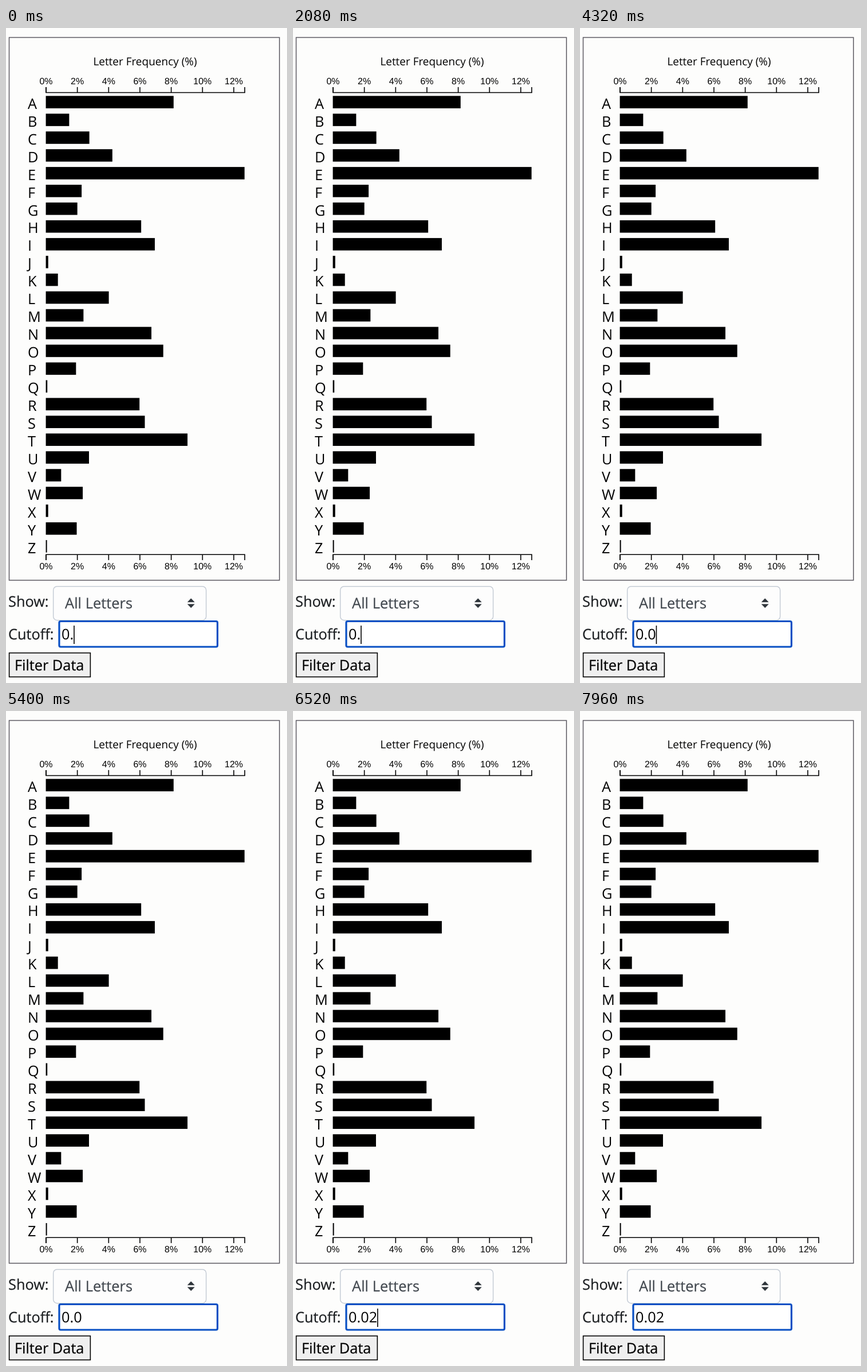
These frames come from a looping animation (491x1141 px, 8000 ms). An HTML page:

```html
<!DOCTYPE html>
<html lang="en">
<head>
<meta charset="utf-8">
<title>Letter Frequency</title>
<style>
  html, body { margin: 0; width: 100%; height: 100%; overflow: hidden; background: #fdfdfc; }
  svg { display: block; font: 25.3px "Open Sans", "Noto Sans", sans-serif; text-rendering: geometricPrecision; }
  .axis { font: 16px "Liberation Sans", Arial, sans-serif; text-anchor: middle; }
  .line { fill: none; stroke: #000; stroke-width: 1.6; }
  .label { fill: #1b1e21; stroke: #1b1e21; stroke-width: 0.25; }
</style>
</head>
<body>
<svg width="491" height="1141" viewBox="0 0 491 1141">
  <rect x="5.5" y="16.5" width="472.3" height="945.5" fill="none" stroke="#5c5a62" stroke-width="1.5"/>
  <text x="243" y="65" font-size="19" text-anchor="middle">Letter Frequency (%)</text>
  <g id="chart"></g>

  <text class="label" x="4" y="1008">Show:</text>
  <rect x="82.7" y="972.7" width="267" height="59" rx="6.5" fill="#fdfdfd" stroke="#c6cdd6" stroke-width="1.5"/>
  <text x="103" y="1011" font-size="25.5" fill="#42484f" stroke="#42484f" stroke-width="0.25">All Letters</text>
  <path d="M316.8 1000.3l6.5-6.8 6.5 6.8zM316.8 1003.5l6.5 6.8 6.5-6.8z" fill="#2f353b"/>

  <text class="label" x="4" y="1065">Cutoff:</text>
  <rect x="93" y="1033.5" width="276.5" height="44.5" rx="2.5" fill="#fff" stroke="#0950c4" stroke-width="3.2"/>
  <text id="value" x="97" y="1065"></text>
  <rect id="caret" y="1041" width="1.6" height="32"/>

  <rect x="5.6" y="1088.6" width="141.8" height="41.8" fill="#efefef" stroke="#000" stroke-width="1.6"/>
  <text x="15" y="1119" stroke="#000" stroke-width="0.25">Filter Data</text>
</svg>
<script>
const frequencies = [
  8.167, 1.492, 2.782, 4.253, 12.702, 2.288, 2.015, 6.094, 6.966, 0.153, 0.772, 4.025, 2.406,
  6.749, 7.507, 1.929, 0.095, 5.987, 6.327, 9.056, 2.758, 0.978, 2.36, 0.15, 1.974, 0.074
];
const left = 70, right = 417.2, rowStep = 30.95;
const scale = (right - left) / 12.702;

const bars = frequencies.map((percent, i) => {
  const y = 118.3 + i * rowStep;
  return `<rect x="${left - 0.4}" y="${y}" width="${percent * scale}" height="21.6"/>
    <text x="38" y="${y + 22.5}">${String.fromCharCode(65 + i)}</text>`;
});

function axis(y, direction, baseline) {
  const tickEnd = y + direction * 9.6;
  let out = `<path class="line" d="M${left} ${tickEnd}V${y}H${right}V${tickEnd}"/>`;
  for (let percent = 0; percent <= 12; percent += 2) {
    const x = left + percent * scale;
    out += `<path class="line" d="M${x} ${y}V${tickEnd}"/>
      <text class="axis" x="${x}" y="${baseline}">${percent}%</text>`;
  }
  return out;
}

document.getElementById('chart').innerHTML =
  bars.join('') + axis(112.5, -1, 98) + axis(917.3, 1, 942.5);

// Each step: start time in ms, typed text, caret visible
const steps = [
  [0, '0.', true], [800, '0.', false], [1660, '0.', true],
  [2500, '0.', false], [3180, '0.', true],
  [4000, '0.0', true], [5000, '0.0', false],
  [6000, '0.02', true], [7000, '0.02', false]
];
const value = document.getElementById('value');
const caret = document.getElementById('caret');

function draw(now) {
  const time = now % 8000;
  const [, text, visible] = steps.findLast(step => step[0] <= time);
  value.textContent = text;
  caret.setAttribute('x', 97 + value.getComputedTextLength());
  caret.setAttribute('visibility', visible ? 'visible' : 'hidden');
  requestAnimationFrame(draw);
}
draw(0);
</script>
</body>
</html>
```
